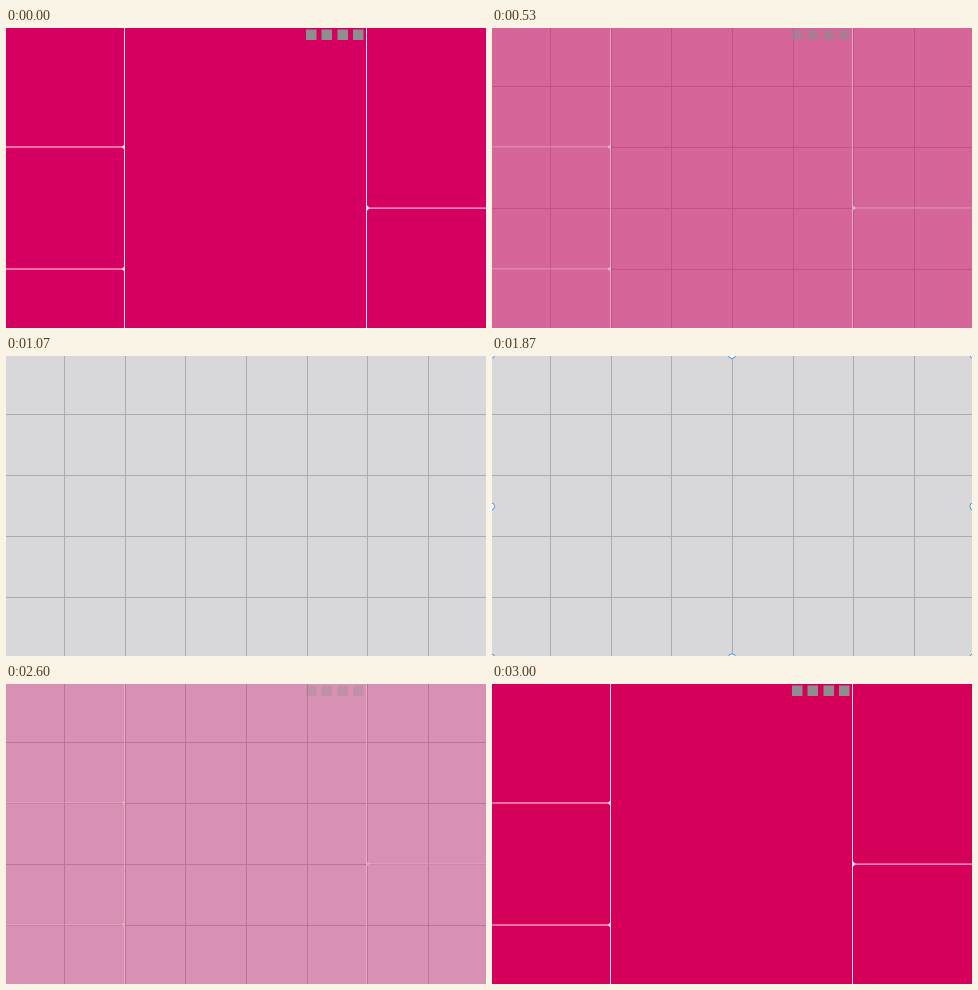
An HTML page with a canvas for the animation above (3.07 s loop, 480 px wide and 300 px high).

```html
<!DOCTYPE html>
<html lang="en">
<head>
<meta charset="utf-8">
<title>Panels to grid</title>
<style>
  html, body { margin: 0; width: 100%; height: 100%; overflow: hidden; background: #d8d8da; }
  canvas { display: block; }
</style>
</head>
<body>
<canvas id="stage" width="480" height="300"></canvas>
<script>
const W = 480, H = 300, LOOP = 3070, STEP = 1000 / 15;
const ctx = document.getElementById('stage').getContext('2d');

// Sine ease from 0 to 1 between two times
function ease(t, from, to) {
  const x = Math.min(1, Math.max(0, (t - from) / (to - from)));
  return (1 - Math.cos(Math.PI * x)) / 2;
}

function rect(color, x, y, w, h) {
  ctx.fillStyle = color;
  ctx.fillRect(x, y, w, h);
}

function drawGrid() {
  rect('#d8d8da', 0, 0, W, H);
  for (const x of [58, 119, 179, 240, 301, 361, 422]) rect('#acacae', x, 0, 1, H);
  for (const y of [58, 119, 180, 241]) rect('#acacae', 0, y, W, 1);
}

function drawNotch(x, y, dir) {
  ctx.beginPath();
  ctx.moveTo(x, y - 2.5);
  ctx.lineTo(x + dir * 3, y);
  ctx.lineTo(x, y + 2.5);
  ctx.fill();
}

function drawPanels(pink) {
  const line = '#fbe3ee';
  rect(pink, 0, 0, W, H);
  rect(line, 118, 0, 1, H);
  rect(line, 360, 0, 1, H);
  for (const y of [119, 241]) {
    rect(line, 0, y - 0.5, 118, 1);
    drawNotch(118.5, y, -1);
  }
  rect(line, 361, 179.6, 119, 1);
  drawNotch(361, 180, 1);
  for (const x of [300, 315.5, 331.5, 347]) rect('#8e8e8e', x, 1.5, 10.5, 10.5);
}

function drawHandles() {
  ctx.fillStyle = '#fff';
  ctx.strokeStyle = '#3f97d0';
  ctx.lineWidth = 1;
  for (const x of [-1, 240, 481.5]) {
    for (const y of [-1.2, 150.5, 301.5]) {
      if (x === 240 && y === 150.5) continue;
      ctx.beginPath();
      ctx.arc(x, y, 3.6, 0, Math.PI * 2);
      ctx.fill();
      ctx.stroke();
    }
  }
}

function draw(now) {
  const ms = now % LOOP;
  const step = Math.floor((ms + 5) / STEP);
  const t = step * STEP;
  const gridShare = ease(t, 60, 1045) - ease(t, 2345, 3000);

  drawGrid();
  if (ms >= 1870 && ms < 2400) drawHandles();
  ctx.globalAlpha = 1 - gridShare;
  drawPanels(step >= 45 ? '#d4005a' : '#d60062');
  ctx.globalAlpha = 1;
}

const start = performance.now();
function tick() {
  draw(performance.now() - start);
  requestAnimationFrame(tick);
}
tick();
</script>
</body>
</html>
```
